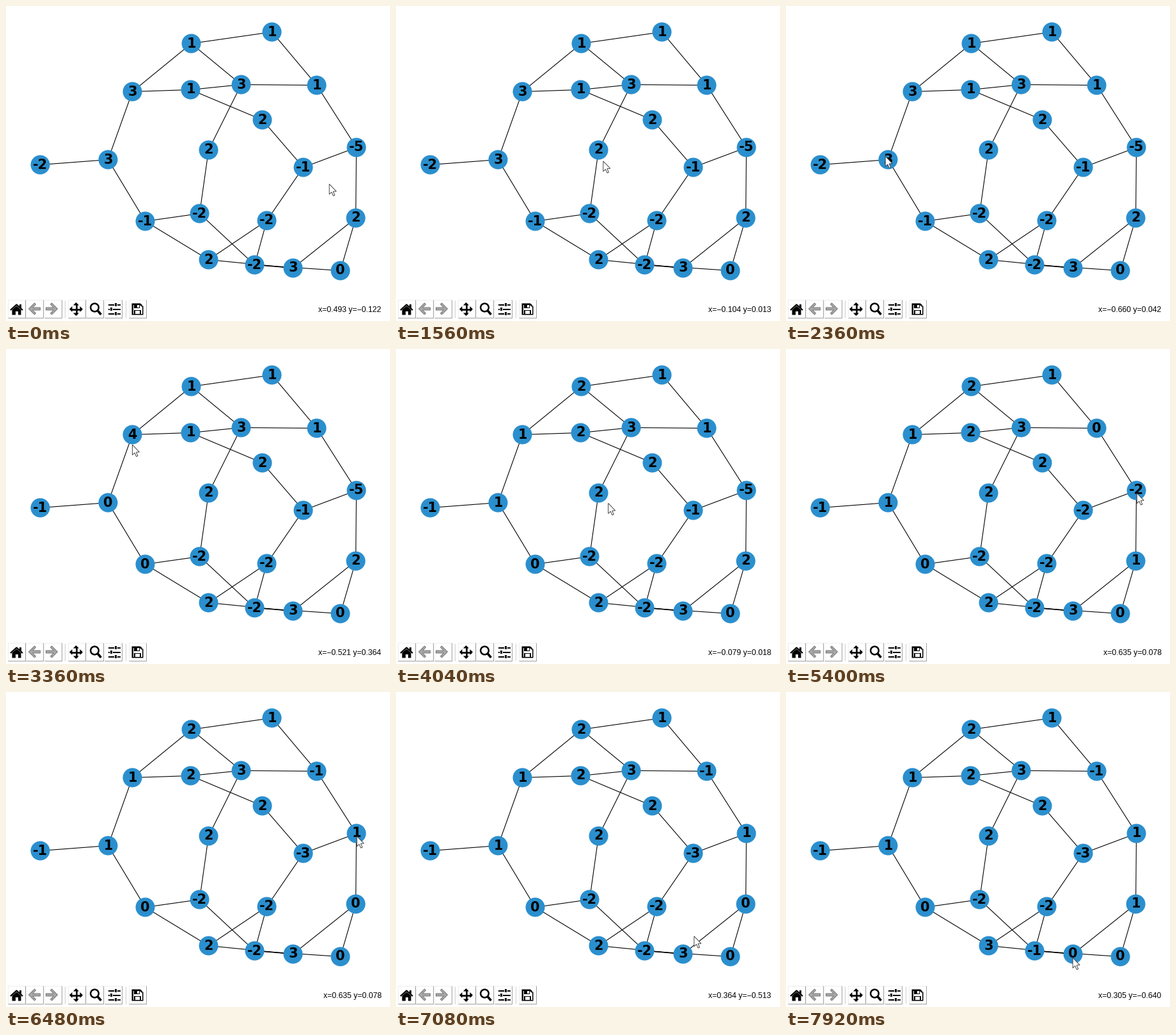
A matplotlib script that plays this animation: 600 px wide and 491 px high, repeating every 8.04 s.

```python
from itertools import pairwise

import numpy as np
import matplotlib.pyplot as plt
from matplotlib.animation import FuncAnimation
from matplotlib.patches import Circle, Polygon, Rectangle

W, H, DPI = 600, 491, 100
STEP, FRAMES = 40, 201
PT = 72 / DPI
BLUE = "#2b8fce"

# One path visits every node in this order; chords add the other links.
NODES = [(53, 247), (159, 239), (197, 133), (289, 58), (415, 40),
         (485, 123), (547, 220), (546, 330), (522, 412), (388, 403),
         (448, 408), (316, 395), (407, 334), (464, 251), (400, 177),
         (288, 130), (367, 122), (316, 224), (302, 323), (217, 335)]
CHIPS = [-2, 3, 3, 1, 1, 1, -5, 2, 0, -2, 3, 2, -2, -1, 2, 1, 3, 2, -2, -1]
CHORDS = [(1, 19), (2, 15), (3, 16), (5, 16), (6, 13), (7, 10),
          (9, 12), (9, 18), (11, 19)]
EDGES = [*pairwise(range(len(NODES))), *CHORDS]

# Pointer trips: leave, arrive, goal in data units, bow of the path
START = (.493, -.122)
TRIPS = [(1300, 2150, (-.660, .042), .05), (2700, 3320, (-.521, .364), 0),
         (3800, 4920, (.635, .078), -.25), (6640, 7400, (.305, -.640), 0)]
# What is clicked after each trip: node, chips sent per edge, clicks
CLICKS = [(1, 1, 1), (2, 1, 1), (6, -1, 2), (10, 1, 1)]
CLICK_DELAY, CLICK_GAP = 240, 320

fig = plt.figure(figsize=(W / DPI, H / DPI), dpi=DPI, facecolor="white")
ax = fig.add_axes([0, 0, 1, 1])
ax.set_xlim(-.5, W - .5)  # whole numbers are pixel centres
ax.set_ylim(H - .5, -.5)
ax.axis("off")


def line(points, color="black", px=1.0, z=1):
    xs, ys = zip(*points)
    ax.plot(xs, ys, color=color, lw=px * PT, zorder=z, solid_capstyle="butt")


def poly(points, color="black", z=3, **style):
    return ax.add_patch(Polygon(points, closed=True, fc=color, zorder=z,
                                **{"lw": 0, **style}))


def box(x, y, w, h, color="black", z=3):
    ax.add_patch(Rectangle((x, y), w, h, fc=color, lw=0, zorder=z))


def disc(center, radius, color, z=2, **style):
    ax.add_patch(Circle(center, radius, fc=color, zorder=z,
                        **{"lw": 0, **style}))


def button(x):
    line([(x, 485), (x, 457), (x + 27, 457)], "#eeeeee")
    line([(x, 485), (x + 27, 485), (x + 27, 457)], "#a0a0a0")


def draw_home(cx=16, cy=472):
    box(cx + 4.5, cy - 8, 2.5, 6)
    poly([(cx - 7, cy + 1), (cx, cy - 5), (cx + 7, cy + 1),
          (cx + 7, cy + 9), (cx - 7, cy + 9)])
    line([(cx - 9.5, cy + 1.5), (cx, cy - 7), (cx + 9.5, cy + 1.5)],
         px=2.2, z=4)
    box(cx - 2, cy + 3, 4, 6, "white", 4)


def draw_arrow(cx, side, cy=471.5):
    upper = np.array([(-9, 0), (0, -9), (2, -7), (-3, -2), (9, -2)])
    outline = np.vstack([upper, upper[::-1] * (1, -1)])
    poly(outline * (side, 1) + (cx, cy), "#bdbdbd",
         lw=0.8, ec="#808080", hatch="......")


def draw_pan(cx=109, cy=472):
    head = np.array([(10.5, 0), (6, 4.5), (6, -4.5)])
    for turn in range(4):
        c, s = np.cos(turn * np.pi / 2), np.sin(turn * np.pi / 2)
        poly(head @ [(c, s), (-s, c)] + (cx, cy))
        line([(cx, cy), (cx + 8 * c, cy + 8 * s)], px=2.6, z=3)


def draw_zoom(cx=138, cy=469.5):
    disc((cx, cy), 6.3, "white", 3, ec="black", lw=2.5 * PT)
    line([(cx + 4.5, cy + 4.5), (cx + 10, cy + 11)], px=3.6, z=3)


def draw_sliders(cx=168, cy=472):
    for k in (-1, 0, 1):
        y, knob = cy + 7 * k, cx - 4 + 7 * abs(k)
        line([(cx - 9, y), (cx + 10, y)], px=2, z=3)
        box(knob - 2.5, y - 3, 5, 6, "white")
        box(knob - 1.5, y - 2.5, 3, 5, z=4)


def draw_save(x=196, y=463, size=18):
    cut = size - 4.5
    poly([(x, y), (x + cut, y), (x + size, y + 4.5),
          (x + size, y + size), (x, y + size)])
    box(x + 2, y + 2, 14, 14, "white")
    poly([(x + 16, y + 2), (x + 12, y + 2), (x + 16, y + 6)])
    box(x + 3.5, y + 1, 9, 6.5)
    box(x + 8.5, y + 2, 2.5, 4, "white", 4)
    box(x + 3.5, y + 10, 11, 7)
    box(x + 5.2, y + 11.7, 7.6, 4.5, "white", 4)


def draw_toolbar():
    for first, count in [(2, 3), (96, 3), (191, 1)]:
        for k in range(count):
            button(first + 28.5 * k)
        if first > 2:
            line([(first - 5, 458), (first - 5, 485)], "#d0d0d0")
    draw_home()
    draw_arrow(44, 1)
    draw_arrow(71, -1)
    draw_pan()
    draw_zoom()
    draw_sliders()
    draw_save()


for a, b in EDGES:
    line([NODES[a], NODES[b]], px=1.1)
for center in NODES:
    disc(center, 15, BLUE)
draw_toolbar()

labels = [ax.text(x, y, "", family="DejaVu Sans", weight="bold", size=15,
                  ha="center", va="center", zorder=5) for x, y in NODES]
readout = ax.text(586, 476, "", family="Liberation Sans", size=12.3 * PT,
                  ha="right", va="baseline", zorder=5)
ARROW = np.array([(0, 0), (0, 16), (3.6, 12.6), (6.2, 18.4), (8.6, 17.4),
                  (6.1, 11.7), (11, 11.4)])
cursor = poly(ARROW, "white", 10, lw=0.65, ec="#383838", joinstyle="miter")


def pointer_at(t):
    x, y = START
    for leave, arrive, (goal_x, goal_y), bow in TRIPS:
        u = np.clip((t - leave) / (arrive - leave), 0, 1)
        s = 1 - (1 - u) ** 2
        x += s * (goal_x - x)
        y += s * (goal_y - y) + 4 * bow * s * (1 - s)
    return x, y


def chips_at(t):
    chips = list(CHIPS)
    for (_, arrive, *_), (node, amount, clicks) in zip(TRIPS, CLICKS):
        for k in range(clicks):
            if t < arrive + CLICK_DELAY + k * CLICK_GAP:
                return chips
            for a, b in EDGES:
                if node in (a, b):
                    chips[node] -= amount
                    chips[a + b - node] += amount
    return chips


def update(frame):
    t = frame * STEP
    for label, value in zip(labels, chips_at(t)):
        label.set_text(str(value))
    x, y = pointer_at(t)
    readout.set_text(f"x={x:.3f} y={y:.3f}".replace("-", "\u2212"))
    cursor.set_xy(ARROW + (355 + 303.5 * x, 244.8 - 264 * y))
    return [*labels, readout, cursor]


anim = FuncAnimation(fig, update, frames=FRAMES, interval=STEP,
                     repeat=True, repeat_delay=0, blit=False)
plt.show()
```
